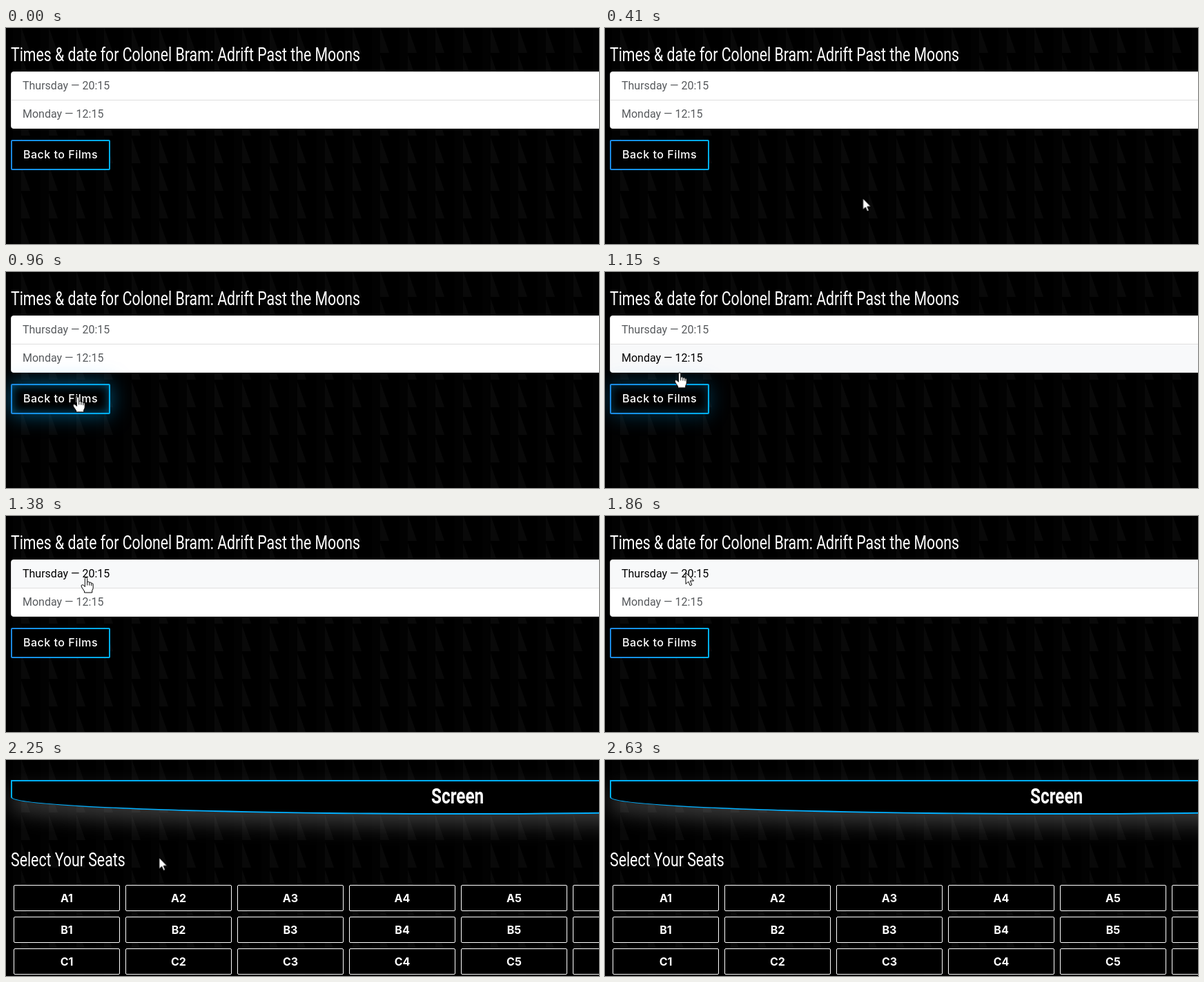
An HTML page for the animation above (4080 ms loop, 859 by 313 pixels).

```html
<!DOCTYPE html>
<html lang="en">
<head>
<meta charset="utf-8">
<title>Booking</title>
<style>
  :root { --loop: 4080ms; --blue: #00b0ff; }
  * { box-sizing: border-box; }
  html, body { margin: 0; width: 100%; height: 100%; overflow: hidden; background: #000; }
  body { position: relative; color: #fff; font: 16px/24px Roboto, sans-serif; }
  .backdrop { position: absolute; width: 100%; height: 100%; }
  .page { position: absolute; inset: 0; overflow: hidden; }
  .page > * { position: absolute; }

  .condensed {
    left: 7px; margin: 0; white-space: nowrap;
    font: 400 28px/34px Roboto, sans-serif;
    transform: scaleX(.76); transform-origin: 0 0;
  }

  .times { animation: leave var(--loop) step-end infinite; }
  .seating { animation: enter var(--loop) step-end infinite; }
  @keyframes leave { 0% { visibility: visible } 46.078%, 100% { visibility: hidden } }
  @keyframes enter { 0% { visibility: hidden } 46.078%, 100% { visibility: visible } }

  .list {
    left: 7px; top: 63px; width: 1295px; height: 83px; overflow: hidden;
    border: 1px solid #dfdfdf; border-radius: 4px; background: #fff;
  }
  .list div { height: 41px; padding: 8px 16px; color: #585b5e; background: #fff; }
  .list div:first-child { border-bottom: 1px solid #dfdfdf; animation: thursday var(--loop) step-end infinite; }
  .list div:last-child { animation: monday var(--loop) step-end infinite; }
  @keyframes thursday {
    31.6% { color: #000; background: #f8f9fa }
    46.1% { color: #585b5e; background: #fff }
  }
  @keyframes monday {
    28.2% { color: #000; background: #f8f9fa }
    31.6% { color: #585b5e; background: #fff }
  }

  .back {
    left: 7px; top: 162px; width: 144px; height: 44px;
    border: 2px solid transparent; border-radius: 2px;
    background: linear-gradient(#000, #000) padding-box, linear-gradient(90deg, #1c88e0, var(--blue)) border-box;
    text-align: center; font: 500 16px/39px Inter, sans-serif; letter-spacing: .5px;
  }
  .back::before {
    content: ""; position: absolute; inset: -2px; border-radius: 2px;
    box-shadow: 0 0 30px rgba(0, 176, 255, .5);
    animation: glow var(--loop) linear infinite;
  }
  .back::after {
    content: ""; position: absolute; inset: 0;
    box-shadow: inset 0 0 14px rgba(0, 176, 255, .5);
    animation: glow var(--loop) linear infinite;
  }
  @keyframes glow {
    0%, 13.7%, 30.9%, 100% { opacity: 0 }
    19.6%, 26.7% { opacity: 1 }
  }

  .screen {
    left: 7px; top: 29px; width: 1295px; height: 50px;
    border: 2px solid var(--blue); border-radius: 0 0 50% 50%; background: #000;
    box-shadow: 0 15px 30px rgba(255, 255, 255, .22);
  }
  .label { left: 616px; top: 32px; font-size: 32px; line-height: 40px; font-weight: 700; }

  .seat {
    width: 154px; height: 38px; border: 1px solid #fff; border-radius: 2px;
    background: #000; text-align: center; font: 700 16px/36px Inter, sans-serif;
  }
  .A2 { animation: a2 var(--loop) step-end infinite; }
  .A3 { animation: a3 var(--loop) step-end infinite; }
  .B3 { animation: b3 var(--loop) step-end infinite; }
  .C3 { animation: c3 var(--loop) step-end infinite; }
  @keyframes a2 { 57.5% { color: var(--blue); border-color: var(--blue) } 58.6% { color: #fff; border-color: #fff } }
  @keyframes a3 { 58.9% { color: var(--blue); border-color: var(--blue) } 59.4% { color: #fff; border-color: #fff } }
  @keyframes b3 { 59.8% { color: var(--blue); border-color: var(--blue) } 61.6% { color: #fff; border-color: #fff } }
  @keyframes c3 { 62% { color: var(--blue); border-color: var(--blue) } 64.4% { color: #fff; border-color: #fff } }

  .cursor { position: absolute; left: 0; top: 0; width: 1px; height: 1px; overflow: visible; animation: move var(--loop) linear infinite; }
  .cursor path { fill: #fff; stroke: #000; stroke-linejoin: round; }
  .arrow { animation: arrow var(--loop) step-end infinite; }
  .hand { animation: hand var(--loop) step-end infinite; }
  @keyframes move {
    0%, 5.637% { transform: translate(744px, 300px) }
    9.804% { transform: translate(390px, 250px) }
    13.725% { transform: translate(150px, 203px) }
    15.931% { transform: translate(88px, 187px) }
    18.627% { transform: translate(90px, 186px) }
    23.529% { transform: translate(104px, 181px) }
    26.716% { transform: translate(106px, 162px) }
    28.186% { transform: translate(108px, 146px) }
    31.618% { transform: translate(113px, 103px) }
    33.824% { transform: translate(116px, 89px) }
    42.157%, 51.471% { transform: translate(117px, 82px) }
    55.147% { transform: translate(221px, 141px) }
    57.843% { transform: translate(305px, 187px) }
    63.97%, 100% { transform: translate(474px, 316px) }
  }
  @keyframes arrow {
    0% { opacity: 0 } 5.637% { opacity: 1 } 13.725% { opacity: 0 }
    26.716% { opacity: 1 } 28.186% { opacity: 0 }
    45.588% { opacity: 1 } 57.5%, 100% { opacity: 0 }
  }
  @keyframes hand {
    0% { opacity: 0 } 13.725% { opacity: 1 } 26.716% { opacity: 0 }
    28.186% { opacity: 1 } 45.588% { opacity: 0 }
    57.5% { opacity: 1 } 63.97%, 100% { opacity: 0 }
  }
</style>
</head>
<body>
<svg class="backdrop">
  <defs>
    <pattern id="weave" width="40" height="40" y="-3" patternUnits="userSpaceOnUse">
      <path d="M10 0h12v40h-12z" fill="#020202"/>
      <path d="M22 2L35 39H22z" fill="#090909"/>
    </pattern>
  </defs>
  <rect width="100%" height="100%" fill="url(#weave)"/>
</svg>

<main class="page times">
  <h1 class="condensed" style="top:22px">Times &amp; date for Colonel Bram: Adrift Past the Moons</h1>
  <div class="list">
    <div>Thursday — 20:15</div>
    <div>Monday — 12:15</div>
  </div>
  <div class="back">Back to Films</div>
</main>

<main class="page seating">
  <div class="screen"></div>
  <h1 class="condensed label">Screen</h1>
  <h2 class="condensed" style="top:128px">Select Your Seats</h2>
</main>

<svg class="cursor">
  <path class="arrow" d="M0 0V16.5L3.8 13L6.3 18.8L8.8 17.7L6.4 12H11.6Z"/>
  <path class="hand" d="M-1.7 1.8a1.7 1.8 0 0 1 3.4 0v5.2a1.7 1.5 0 0 1 3.2 .7a1.7 1.5 0 0 1 3 1a1.6 1.5 0 0 1 2.3 1.5V15q0 2-1.5 4v3H-2.5V20L-6.5 14Q-8 11-5.5 10.7Q-3.5 10.6-1.7 13.5ZM1.7 7v4.5M4.9 7.7v4M7.9 8.7v3.5"/>
</svg>

<script>
  const seating = document.querySelector('.seating');
  [...'ABC'].forEach((row, r) => {
    for (let n = 1; n <= 6; n++) {
      const seat = document.createElement('div');
      seat.className = `seat ${row}${n}`;
      seat.textContent = row + n;
      seat.style.left = `${162 * n - 151}px`;
      seat.style.top = `${181 + 46 * r}px`;
      seating.append(seat);
    }
  });
</script>
</body>
</html>
```
